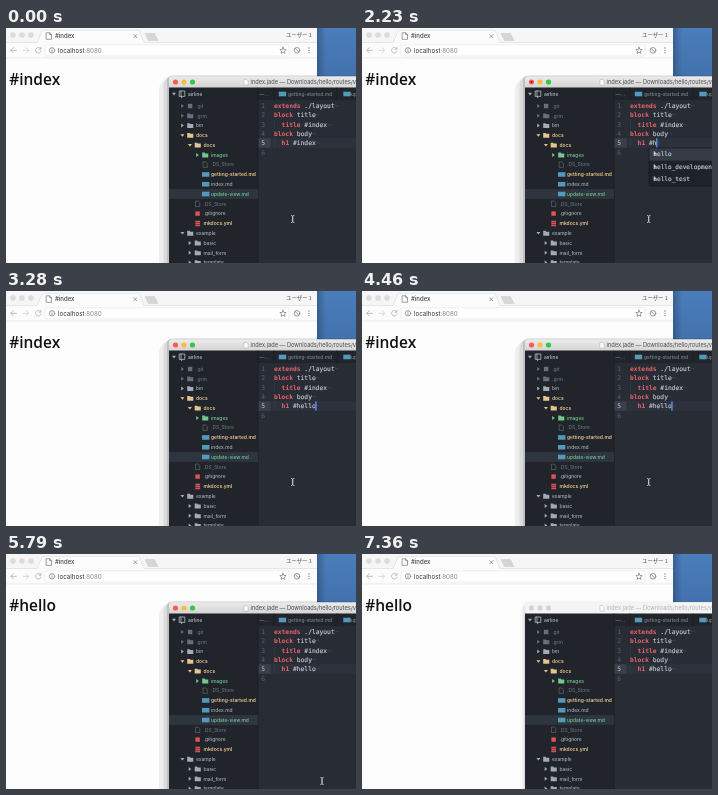
Write an HTML page that moves like this. It is 350 px wide and 235 px high and loops after 7.46 s.

```html
<!DOCTYPE html>
<html lang="en">
<head>
<meta charset="utf-8">
<title>Live editing</title>
<style>
html, body { margin: 0; width: 100%; height: 100%; overflow: hidden; background: #fdfdfd; }
svg { display: block; width: 350px; height: 235px; }
text { white-space: pre; }
.ui { font: 500 4.9px Inter, sans-serif; }
.code { font-family: "DejaVu Sans Mono", monospace; font-size: 6.3px; fill: #c3c9d4; stroke: #c3c9d4; stroke-width: .15; }
.kw { fill: #e8636e; font-weight: bold; stroke: none; }
.eol { fill: #454b57; stroke: none; }
.num { fill: #5a6272; stroke: none; }
.hit { fill: #fff; font-weight: bold; stroke: none; }
.heading { font: 600 15.5px "Open Sans", sans-serif; fill: #111; }
.line { fill: none; stroke-linecap: round; stroke-linejoin: round; }
.idle .focus, .busy .ready, svg:not(.idle) .blur, svg:not(.busy) .wait { display: none; }
.idle .title { fill: #b4b4b4; }
</style>
</head>
<body>
<svg id="stage" viewBox="0 0 350 235" xmlns="http://www.w3.org/2000/svg">
  <defs>
    <linearGradient id="sky" x2="0" y2="1"><stop stop-color="#4a7dbb"/><stop offset="1" stop-color="#416fa9"/></linearGradient>
    <linearGradient id="bar" x2="0" y2="1"><stop stop-color="#ebebeb"/><stop offset="1" stop-color="#d2d2d2"/></linearGradient>
    <linearGradient id="edge"><stop stop-opacity=".22"/><stop offset="1" stop-opacity="0"/></linearGradient>
    <filter id="thin" x="-20%" y="-20%" width="140%" height="140%"><feGaussianBlur stdDeviation="2.5"/></filter>
  </defs>

  <rect x="300" width="50" height="60" fill="url(#sky)"/>
  <rect x="311" width="9" height="60" fill="url(#edge)"/>

  <g id="browser">
    <rect width="311" height="235" fill="#fdfdfd"/>
    <rect width="311" height="15" fill="#f6f6f6"/>
    <rect y="14.5" width="311" height="15.5" fill="#fcfcfc"/>
    <path d="M0 14.5H31L36 3.2Q36.5 2.3 37.5 2.3H132Q133 2.3 133.5 3.2L138 14.5H311" fill="#fcfcfc" stroke="#d3dae0" stroke-width=".6"/>
    <path d="M0 30H311" stroke="#dcdfe2" stroke-width=".6"/>
    <path d="M139 5.5H148.5L152 12.5H142.5Z" fill="#d6d6d6" stroke="#c8c8c8" stroke-width=".5"/>
    <g fill="#dcdcdc"><circle cx="7" cy="7" r="2.8"/><circle cx="16" cy="7" r="2.8"/><circle cx="25" cy="7" r="2.8"/></g>
    <g class="line" stroke="#777" stroke-width=".7">
      <path class="ready" d="M40.5 4.8H43.6L45.5 6.7V11.3H40.5ZM43.6 4.8V6.7H45.5"/>
      <path class="wait" d="M43 5.2A3 3 0 1 0 46 8.2"/>
      <path d="M127.8 6.7L130.8 9.7M130.8 6.7L127.8 9.7"/>
    </g>
    <text class="ui" x="49" y="10.4" style="font-size:6px" fill="#444">#index</text>
    <text x="280" y="9.2" font-family="Noto Sans CJK JP, Noto Sans CJK, sans-serif" font-size="5.4" fill="#555">ユーザー 1</text>
    <g class="line" stroke="#b4b8bc" stroke-width=".9">
      <path d="M10.5 22.3H4.8M7.4 19.7L4.8 22.3L7.4 24.9"/>
      <path d="M17 22.3H22.7M20.1 19.7L22.7 22.3L20.1 24.9" stroke="#d4d6d8"/>
      <path class="ready" d="M34.6 20.6A2.8 2.8 0 1 0 35 23.2M35 19.2V21.2H33"/>
      <path class="wait" d="M30.2 20L34.7 24.6M34.7 20L30.2 24.6"/>
    </g>
    <rect x="39" y="16.8" width="244" height="11.2" rx="1.5" fill="#fff" stroke="#dde2e6" stroke-width=".6"/>
    <g class="line" stroke="#777" stroke-width=".7">
      <circle cx="46" cy="22.3" r="2.7"/><path d="M46 22V23.7M46 20.8V20.9"/>
      <path d="M277 19.2L277.9 21.4L280.2 21.6L278.4 23.1L279 25.4L277 24.1L275 25.4L275.6 23.1L273.8 21.6L276.1 21.4Z"/>
      <circle cx="291" cy="22.3" r="2.8"/><path d="M289.3 20.5L292.7 24.1"/>
    </g>
    <g fill="#777"><circle cx="303" cy="20" r=".65"/><circle cx="303" cy="22.3" r=".65"/><circle cx="303" cy="24.6" r=".65"/></g>
    <text class="ui" x="52" y="24.6" style="font-size:6.2px;font-weight:400" fill="#333">localhost<tspan fill="#888">:8080</tspan></text>
    <text class="heading" x="3.2" y="57" id="heading"></text>
  </g>

  <g class="focus">
    <rect x="153" y="48" width="230" height="230" rx="15" opacity=".06"/>
    <rect x="157.5" y="47.5" width="220" height="220" rx="10" opacity=".08"/>
    <rect x="161" y="47.5" width="210" height="210" rx="5" opacity=".12"/>
  </g>
  <rect class="blur" x="163" y="51" width="210" height="210" rx="3" opacity=".28" filter="url(#thin)"/>

  <g id="editor">
    <path d="M163 61V51.3Q163 48.3 166 48.3H350V61Z" fill="url(#bar)"/>
    <path class="blur" d="M163 61V51.3Q163 48.3 166 48.3H350V61Z" fill="#f4f4f4"/>
    <g class="focus">
      <circle cx="169.5" cy="54" r="2.6" fill="#fc5b57"/><circle cx="178" cy="54" r="2.6" fill="#fdbb3f"/><circle cx="186.5" cy="54" r="2.6" fill="#35c649"/>
      <circle id="dirty" cx="169.5" cy="54" r="1" fill="#7c1512"/>
    </g>
    <g class="blur" fill="#d3d3d3">
      <circle cx="169.5" cy="54" r="2.6"/><circle cx="178" cy="54" r="2.6"/><circle cx="186.5" cy="54" r="2.6"/>
    </g>
    <path d="M238 51.4H240.5L242 52.9V57H238Z" fill="#fff" stroke="#aaa" stroke-width=".5"/>
    <text class="ui title" x="244.5" y="56.2" style="font-size:5.7px;font-weight:400" fill="#4c4c4c">index.jade — Downloads/hello/routes/views</text>

    <rect x="163" y="59.5" width="187" height="175.5" fill="#21252b"/>
    <rect x="252" y="72" width="98" height="163" fill="#282c34"/>
    <path d="M252 59.5V235M268 59.5V72M331 59.5V72" stroke="#181a1f" stroke-width=".6"/>
    <text class="ui" x="253.5" y="68" fill="#8a92a0">—…</text>
    <text class="ui" x="282" y="68" fill="#7b8391">getting-started.md</text>
    <text class="ui" x="345" y="68" fill="#7b8391">update-view.md</text>
    <rect x="163" y="161.1" width="89" height="9.8" fill="#2f353f"/>
    <g id="tree"></g>

    <rect x="252" y="110.2" width="98" height="9.6" fill="#2c313c"/>
    <rect x="253" y="110.2" width="11.5" height="9.6" fill="#3a404b"/>
    <path d="M268.4 92.3V101M268.4 110.5V119.5" stroke="#3d434e" stroke-width=".5"/>
    <g id="lines"></g>
    <rect id="caret" y="110.3" width="1.3" height="9.4" fill="#5a94ff"/>
    <g id="popup">
      <rect x="287" y="120" width="70" height="38" rx="1" fill="#1f2228" stroke="#15171b" stroke-width=".7"/>
      <rect x="287.4" y="120.4" width="70" height="12.2" fill="#363c47"/>
    </g>
  </g>

  <g id="mouse" class="line">
    <path d="M-1.3-3.5Q0-3.5 0-2.7V2.7Q0 3.5-1.3 3.5M1.3-3.5Q0-3.5 0-2.7V2.7Q0 3.5 1.3 3.5" stroke="#d8dade" stroke-width=".75"/>
  </g>
</svg>
<script>
const LOOP = 7460, CHAR = 3.8, NS = 'http://www.w3.org/2000/svg';
const $ = id => document.getElementById(id);

function add(parent, tag, attrs, text) {
  const el = document.createElementNS(NS, tag);
  for (const key in attrs) el.setAttribute(key, attrs[key]);
  if (text) el.textContent = text;
  parent.append(el);
  return el;
}

// File tree
const tree = $('tree');
const tint = { dim: '#69707c', plain: '#a4abb8', changed: '#e5c48f', added: '#73c990' };

function arrow(x, y, open, fill) {
  const d = open ? `M${x - 2} ${y - 1.2}h4l-2 2.6z` : `M${x - 1.2} ${y - 2}v4l2.6-2z`;
  add(tree, 'path', { d, fill });
}

function icon(kind, x, y, color) {
  const shapes = {
    folder: `M${x} ${y - 2.3}h2.4l.7 .8h3v4h-6.1z`,
    doc: `M${x + .8} ${y - 2.7}h2.8l1.5 1.5v3.9h-4.3z`,
    square: `M${x + .7} ${y - 2.2}h4.4v4.4h-4.4z`,
    stack: `M${x + .6} ${y - 2.7}h4.8v1.5h-4.8zm0 2h4.8v1.5h-4.8zm0 2h4.8v1.5h-4.8z`,
    md: `M${x - .2} ${y - 2.3}h7.4v4.6h-7.4z`
  };
  const hollow = kind === 'doc';
  add(tree, 'path', { d: shapes[kind], fill: hollow ? 'none' : color, stroke: hollow ? color : 'none', 'stroke-width': .6 });
}

const blue = '#519aba', red = '#e0525a';
arrow(168, 66, true, tint.plain);
add(tree, 'path', { d: 'M173.6 63h5.2v5.4h-5.2zM175 63v5.4M175.6 68.4v1.3', class: 'line', stroke: tint.plain, 'stroke-width': .9 });
add(tree, 'text', { x: 182, y: 67.9, class: 'ui', fill: '#b5bcc8' }, 'airline');
icon('md', 273, 66, blue);
icon('md', 337.5, 66, blue);

// name, depth, state, icon, open
const rows = [
  ['.git', 0, 'dim', 'square', false],
  ['.grm', 0, 'dim', 'folder', false],
  ['bin', 0, 'plain', 'folder', false],
  ['docs', 0, 'changed', 'folder', true],
  ['docs', 1, 'changed', 'folder', true],
  ['images', 2, 'added', 'folder', false],
  ['.DS_Store', 2, 'dim', 'doc'],
  ['getting-started.md', 2, 'changed', 'md'],
  ['index.md', 2, 'plain', 'md'],
  ['update-view.md', 2, 'added', 'md'],
  ['.DS_Store', 1, 'dim', 'doc'],
  ['.gitignore', 1, 'plain', 'square'],
  ['mkdocs.yml', 1, 'changed', 'stack'],
  ['example', 0, 'plain', 'folder', true],
  ['basic', 1, 'plain', 'folder', false],
  ['mail_form', 1, 'plain', 'folder', false],
  ['template', 1, 'plain', 'folder', false]
];
rows.forEach(([name, depth, state, kind, open], i) => {
  const x = 190 + depth * 7.5, y = 78 + i * 9.78, color = tint[state];
  const isFile = open === undefined;
  if (!isFile) arrow(x - 13.6, y, open, color);
  icon(kind, x - 8.8, y, kind === 'md' ? blue : isFile && kind !== 'doc' ? red : color);
  add(tree, 'text', { x, y: y + 1.8, class: 'ui', fill: color, style: state === 'changed' ? 'font-weight:600' : '' }, name);
});

// Code lines: indent, keyword, rest
const code = [[0, 'extends', ' ./layout'], [0, 'block', ' title'], [2, 'title', ' #index'], [0, 'block', ' body'], [2, 'h1', ' #index'], [0, '', '']];
const rest = code.map(([indent, keyword, tail], i) => {
  const y = 79.8 + i * 9.35;
  const num = add($('lines'), 'text', { x: 259, y, class: 'code num', 'text-anchor': 'end' }, String(i + 1));
  if (i === 4) num.style.fill = '#c3c9d4';
  const line = add($('lines'), 'text', { x: 268 + indent * CHAR, y, class: 'code' });
  add(line, 'tspan', { class: 'kw' }, keyword);
  const span = add(line, 'tspan', {}, tail);
  if (keyword) add(line, 'tspan', { class: 'eol' }, '¬');
  return span;
});

// Suggestions
const words = ['hello', 'hello_development', 'hello_test'].map((word, i) => {
  const line = add($('popup'), 'text', { x: 291.3, y: 128.3 + i * 12.5, class: 'code', style: 'font-size:6.1px' });
  return { word, hit: add(line, 'tspan', { class: 'hit' }), tail: add(line, 'tspan', {}) };
});

const blinks = [150, 600, 1050, 3420, 3720, 4170, 4460, 4910, 5200, 5640, 6090, 6530, 6820, 7360];
const within = (t, from, to) => t >= from && t < to;
const show = (el, on) => { el.style.display = on ? '' : 'none'; };
const steps = (t, from, gap, max) => t < from ? 0 : Math.min(max, Math.floor((t - from) / gap) + 1);

function draw(t) {
  const typed = steps(t, 2230, 149, 5);
  const word = typed ? 'hello'.slice(0, typed) : 'index'.slice(0, 5 - steps(t, 1340, 147, 5));
  rest[4].textContent = ' #' + word;
  $('caret').setAttribute('x', 275.1 + (4 + word.length) * CHAR);
  show($('caret'), blinks.filter(b => t >= b).length % 2);

  show($('popup'), within(t, 2230, 3280));
  for (const w of words) {
    w.hit.textContent = w.word.slice(0, typed);
    w.tail.textContent = w.word.slice(typed);
  }
  show($('dirty'), within(t, 2230, 3280));

  $('heading').textContent = t < 5350 ? '#index' : '#hello';
  $('stage').classList.toggle('busy', within(t, 5050, 5500));
  $('stage').classList.toggle('idle', t >= 7360);

  const p = steps(t, 4910, 146, 7) / 7, ease = p * p * (3 - 2 * p);
  $('mouse').setAttribute('transform', `translate(${286.7 + 29.3 * ease} ${191 + 36 * ease})`);
  show($('mouse'), t < 6230);
}

const start = performance.now();
function tick() {
  draw((performance.now() - start) % LOOP);
  requestAnimationFrame(tick);
}
tick();
</script>
</body>
</html>
```
